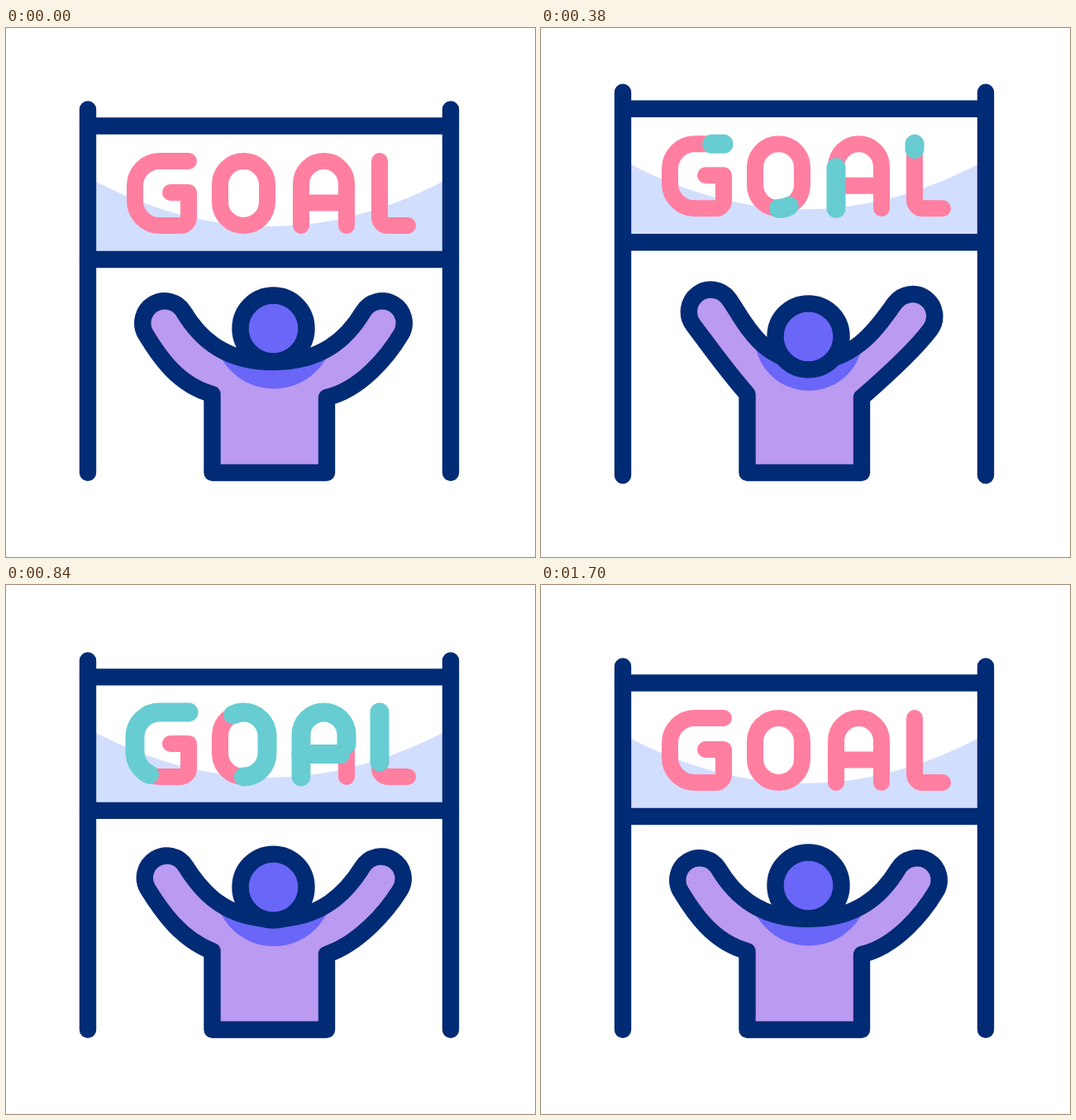
Animation of 640x640 px, one loop 1.88 s. Source, as an HTML page:

```html
<!DOCTYPE html>
<html lang="en">
<head>
<meta charset="utf-8">
<title>Goal</title>
<style>
  html, body { margin: 0; width: 100%; height: 100%; overflow: hidden; background: #fff; }
  svg { display: block; width: 100vw; height: 100vh; }
  .line, .letters { fill: none; stroke-linecap: round; stroke-linejoin: round; }
  .line { stroke: #022b75; stroke-width: 20.4; }
  .letters { stroke: #ff7fa1; stroke-width: 20; }
  #fresh { stroke: #67cdd2; stroke-width: 23; }
  #head, #collar { fill: #6a66f7; }
</style>
</head>
<body>
<svg viewBox="0 0 640 640">
  <defs><clipPath id="inBody"><path id="clip"/></clipPath></defs>
  <g id="banner">
    <path fill="#d2defe" d="M105 183.5L109 186Q318.5 294 528 186L534 183V276H105Z"/>
    <g id="base" class="letters"></g>
    <g id="fresh" class="letters"></g>
    <path class="line" d="M99 118.5H538M99 280H538"/>
  </g>
  <path id="poles" class="line"/>
  <path id="skin" fill="#bb9af1"/>
  <circle id="collar" cx="324" clip-path="url(#inBody)"/>
  <path id="body" class="line"/>
  <circle id="head" class="line" cx="323.5" r="40"/>
</svg>
<script>
const LOOP = 1880, STEP = 20;
const HAND = 26.7, NECK = [323.5, 404];
const $ = id => document.getElementById(id);
const set = (el, attrs) => { for (const k in attrs) el.setAttribute(k, attrs[k]); };

// Progress from 0 to 1 between two times, straight or eased
const ramp = (t, from, to) => Math.min(1, Math.max(0, (t - from) / (to - from)));
const smooth = x => x * x * (3 - 2 * x);
const ease = (t, from, to) => smooth(ramp(t, from, to));

// How much of each letter stroke is recoloured
const steady = t => {
  const x = ramp(t, 100, 1160);
  return 0.15 * x + 0.85 * smooth(x ** 1.8);
};
const legs = t => ramp(t, 150, 1020);
const bar = t => ramp(t, 440, 900);

const strokes = [
  ["M221 161H186A30 30 0 0 0 156 191V209A30 30 0 0 0 186 239H211A10 10 0 0 0 221 229V199H199", steady],
  ["M287.5 239A28.5 28.5 0 0 0 316 210.5V189.5A28.5 28.5 0 0 0 259 189.5V210.5A28.5 28.5 0 0 0 287.5 239", steady],
  ["M357 239V188.5A27.5 27.5 0 0 1 412 188.5V239", legs],
  ["M357 211.5H412", bar],
  ["M452 161V229A10 10 0 0 0 462 239H486", steady]
];

function addPath(parent, d) {
  const p = document.createElementNS("http://www.w3.org/2000/svg", "path");
  set(p, { d, pathLength: 1 });
  return $(parent).appendChild(p);
}
strokes.forEach(([d]) => addPath("base", d));
const fresh = strokes.map(([d, grown]) => ({ el: addPath("fresh", d), grown }));

// Point at a distance from another along an angle
const along = ([x, y], angle, len) => [x + len * Math.cos(angle), y + len * Math.sin(angle)];
const rad = deg => deg * Math.PI / 180;

// Curve points of one arm; side is 1 for left, -1 for right
function arm(side, hand, shoulder, lift, dip) {
  const turn = deg => side > 0 ? rad(deg) : Math.PI - rad(deg);
  const aim = 59 - 6.5 * lift;
  const low = along(hand, turn(aim + 90), HAND);
  const top = along(hand, turn(aim - 90), HAND);
  const chord = Math.atan2(shoulder[1] - low[1], side * (shoulder[0] - low[0])) * 180 / Math.PI;
  const bow = 27 * (1 - lift) + 8 * dip;
  return {
    low, top, shoulder,
    lowOut: along(low, turn(aim), 30),
    lowIn: along(shoulder, turn(chord - bow), 6 * lift - 43),
    topOut: along(top, turn(aim), 39 - 11 * lift),
    topIn: [NECK[0] - side * (58 + 8 * dip), NECK[1]]
  };
}

function bodyPath(lift, dip) {
  const x = 192 + 15 * lift, y = 357 - 17 * lift + 12.6 * dip;
  const l = arm(1, [x, y], [249.5, 443], lift, dip);
  const r = arm(-1, [647 - x + 9 * lift, y + 6 * lift], [388, 447], lift, dip);
  // The small radius is scaled up to a half circle over the hand
  return `M249.5 538L${l.shoulder}C${[l.lowIn, l.lowOut, l.low]}A20 20 0 0 1 ${l.top}` +
    `C${[l.topOut, l.topIn, NECK]}C${[r.topIn, r.topOut, r.top]}` +
    `A20 20 0 0 1 ${r.low}C${[r.lowOut, r.lowIn, r.shoulder]}V538Z`;
}

function draw(t) {
  const sink = ease(t, 0, 160), rise = ease(t, 160, 640);
  const dy = 6 * sink - 61 * rise + 55 * ease(t, 640, 898);
  const foot = 538 + 6 * (sink - rise);
  set($("banner"), { transform: `translate(0 ${dy})` });
  set($("poles"), { d: `M99 ${98.5 + dy}V${foot}M538 ${98.5 + dy}V${foot}` });

  const crouch = ease(t, 0, 180), stretch = ease(t, 180, 440);
  const lift = 0.3 * crouch + 0.7 * stretch - ease(t, 440, 980);
  const dip = crouch - stretch;
  const d = bodyPath(lift, dip);
  for (const id of ["clip", "skin", "body"]) set($(id), { d });
  const cy = 363.5 + 12.5 * lift - 11 * dip;
  set($("head"), { cy });
  set($("collar"), { cy, r: 73 - 9 * lift + 5 * dip });

  for (const { el, grown } of fresh) {
    const f = grown(t);
    set(el, { "stroke-dasharray": f < 1 ? `${f} 2` : "none", visibility: f > 0 ? "visible" : "hidden" });
  }
  set($("fresh"), { opacity: 1 - ramp(t, 1380, 1700) });
}

const start = performance.now();
function tick() {
  const t = (performance.now() - start) % LOOP;
  draw(Math.floor(t / STEP) * STEP);
  requestAnimationFrame(tick);
}
draw(0);
requestAnimationFrame(tick);
</script>
</body>
</html>
```
